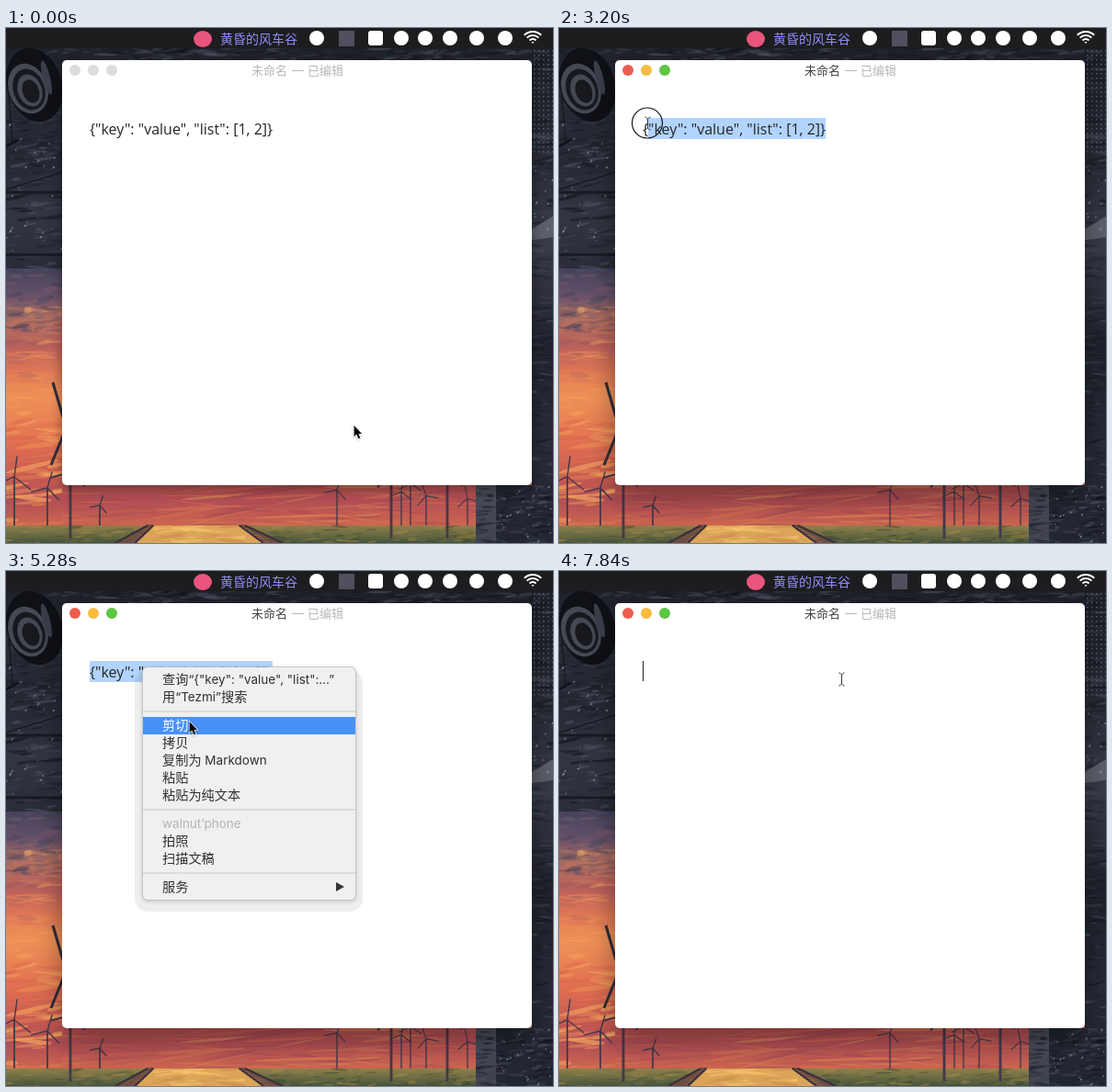
An HTML page with a canvas for the animation above (8000 ms loop, 595 by 561 pixels).

```html
<!DOCTYPE html>
<html lang="zh">
<head>
<meta charset="utf-8">
<style>
html, body { margin: 0; width: 100%; height: 100%; overflow: hidden; background: #1d1d20; }
canvas { display: block; width: 595px; height: 561px; }
</style>
</head>
<body>
<canvas id="stage" width="595" height="561"></canvas>
<script>
const W = 595, H = 561, LOOP = 8000, STEP = 160;
const HORIZON = 542, SKY = 262, EDGE = 511;
const CJK = '"Noto Sans CJK SC", "Noto Sans CJK", "Noto Sans", sans-serif';
const LATIN = 'Inter, sans-serif';
const view = document.getElementById('stage').getContext('2d');
const wall = document.createElement('canvas');
wall.width = W;
wall.height = H;
let c = wall.getContext('2d');

let seed = 41;
function rnd(a, b) {
  seed = (seed * 16807) % 2147483647;
  return a + (b - a) * seed / 2147483647;
}
const pick = list => list[Math.floor(rnd(0, list.length))];

function rect(color, x, y, w, h) {
  c.fillStyle = color;
  c.fillRect(x, y, w, h);
}
function round(color, x, y, w, h, r) {
  c.fillStyle = color;
  c.beginPath();
  c.roundRect(x, y, w, h, r);
  c.fill();
}
function oval(color, x, y, rx, ry = rx, turn = 0) {
  c.fillStyle = color;
  c.beginPath();
  c.ellipse(x, y, rx, ry, turn, 0, 7);
  c.fill();
}
function ring(color, width, x, y, r, from = 0, to = 7) {
  c.strokeStyle = color;
  c.lineWidth = width;
  c.beginPath();
  c.arc(x, y, r, from, to);
  c.stroke();
}
function trace(pts) {
  c.beginPath();
  for (let i = 0; i < pts.length; i += 2) c.lineTo(pts[i], pts[i + 1]);
}
function poly(color, ...pts) {
  c.fillStyle = color;
  trace(pts);
  c.fill();
}
function line(color, width, ...pts) {
  c.strokeStyle = color;
  c.lineWidth = width;
  trace(pts);
  c.stroke();
}
function text(str, x, y, color, font) {
  c.font = font;
  c.fillStyle = color;
  c.fillText(str, x, y);
}
function shadowed(alpha, blur, dy, draw) {
  c.save();
  c.shadowColor = `rgba(0,0,0,${alpha})`;
  c.shadowBlur = blur;
  c.shadowOffsetY = dy;
  draw();
  c.restore();
}

// A box filled with evenly spaced colours from top to bottom
function shade(x, y, w, h, ...colors) {
  const g = c.createLinearGradient(0, y, 0, y + h);
  colors.forEach((color, i) => g.addColorStop(i / (colors.length - 1), color));
  rect(g, x, y, w, h);
}
// Brush strokes scattered in a box
function strokes(x, y, w, h, n, long, thick, colors) {
  c.save();
  c.beginPath();
  c.rect(x, y, w, h);
  c.clip();
  for (let i = 0; i < n; i++) {
    c.globalAlpha = rnd(0.15, 0.6);
    oval(pick(colors), rnd(x, x + w), rnd(y, y + h), rnd(long / 4, long), rnd(0.5, thick), rnd(-0.25, 0.15));
  }
  c.restore();
}
function snow(x, y, w, h, n) {
  for (let i = 0; i < n; i++)
    oval(`rgba(190,200,220,${rnd(0.2, 0.7)})`, rnd(x, x + w), rnd(y, y + h), rnd(0.5, 1.8), 0.8, 2.3);
}

// Wallpaper
function sky() {
  shade(0, SKY, W, HORIZON - SKY, '#454359', '#64506a', '#b46f5f', '#b8605c', '#de7855',
    '#ee9158', '#e98053', '#dc6c50', '#c95c51', '#b04e54', '#cd6650');
  strokes(0, SKY, 61, 70, 60, 14, 3, ['#3b3c52', '#74566a', '#55506a']);
  strokes(0, 300, 61, 26, 9, 14, 4, ['#f8bd63', '#f0a05c']);
  strokes(0, 325, 61, 60, 30, 24, 3, ['#8d5363', '#d9705a', '#ef9a5c']);
  strokes(0, 385, 61, 157, 60, 30, 3, ['#f7a95f', '#d9604f', '#f08c55']);
  strokes(61, 498, 450, 44, 90, 60, 2, ['#9a4355', '#dc7450', '#e08c58', '#b64d52']);
}

function turbine(x, top, foot, size, width) {
  const color = '#46384a', turn = Math.sin(x);
  line(color, width, x, top, x, foot);
  for (let k = 0; k < 3; k++) {
    const a = turn / 3 + (k * 4 - 3) * Math.PI / 6;
    line(color, width * 0.8, x, top, x + Math.cos(a) * size, top + Math.sin(a) * size);
  }
}

function track(top, foot) {
  for (let k = 0; k < 1; k += 0.12) {
    const x = top + (foot - top) * k;
    line('#6f4c42', 2, x - 1, HORIZON + k * 19, x + 7 + k * 16, HORIZON + k * 19);
  }
  line('#38303a', 2, top, HORIZON, foot, H);
  line('#38303a', 2, top + 6, HORIZON, foot + 21, H);
}

function field() {
  shade(0, HORIZON, EDGE, 19, '#927f4a', '#6a6c44', '#46523a');
  strokes(0, HORIZON, EDGE, 19, 150, 12, 2, ['#a88a4c', '#39462f', '#7a7846']);
  poly('#dba557', 158, HORIZON, 256, HORIZON, 290, H, 136, H);
  strokes(160, HORIZON, 100, 19, 30, 25, 2, ['#f3c56e', '#c98d4e']);
  track(154, 119);
  track(254, 280);
  for (const x of [9, 45, 102]) turbine(x, 486 + x / 3, HORIZON, 24 - x / 8, 1.8);
  for (const x of [360, 430, 440, 457, 502]) turbine(x, rnd(495, 515), HORIZON, 14, 1.4);
  for (const x of [70, 419, 480]) turbine(x, 484, H - 5, 22, 2.8);
  line('#312d3a', 3, 51, 386, 62, 424);
  line('#312d3a', 3, 62, 444, 49, 476);
}

function machinery() {
  const metal = ['#12141b', '#3d424e', '#1a1e27', '#505562'];
  shade(0, 22, W, SKY - 22, '#20222a', '#282b35', '#242832', '#323642', '#2a2d38');
  strokes(0, 22, 61, 240, 170, 14, 2, metal);
  oval('#0f1117', 31, 62, 30, 41, -0.3);
  for (let k = 0; k < 4; k++) oval(k % 2 ? '#17191f' : '#454953', 24 + k, 66 + k, 21 - k * 4, 28 - k * 5, -0.35);
  oval('#3c3f4a', 44, 54, 4, 19, -0.25);
  line('#12141b', 3, 0, 129, 13, 122);
  line('#12141b', 1, 3, 72, 7, 124);
  for (const y of [179, 247]) line('#171a22', 3, 0, y, 61, y);
  line('#171a22', 1.5, 0, 176, 61, 157);
  snow(0, 105, 61, 140, 28);
  strokes(61, 22, EDGE, 13, 150, 14, 2, metal);

  shade(EDGE, 498, 22, 63, '#4b4f5b', '#3d414d');
  rect('#222732', 533, 498, 62, 63);
  shade(572, 22, 23, 539, '#1c1f27', '#262a34', '#383c48', '#20242e', '#262b37', '#222732');
  strokes(572, 22, 23, 539, 170, 12, 2, metal);
  strokes(EDGE, 498, 84, 63, 110, 10, 2, metal);
  for (let y = 24; y < 135; y += 5)
    for (let x = 574; x < W; x += 5) rect('#555d6d', x, y, 1.5, 1.5);
  poly('#5d606b', 572, 219, W, 205, W, 228, 572, 231);
  snow(572, 155, 23, 65, 10);
  snow(535, 500, 60, 60, 22);
}

function menuBar() {
  rect('#1d1d20', 0, 0, W, 22);
  oval('#e9557c', 214, 12, 10, 9);
  text('黄昏的风车谷', 233, 17, '#918cf8', '14px ' + CJK);
  rect('#50505e', 362, 3, 17, 17);
  round('#fff', 394, 3, 16, 16, 3);
  for (const x of [338, 430, 456, 483, 512, 543]) oval('#fff', x, 11, 8);
  for (let r = 1; r < 14; r += 4) ring('#fff', 2, 573, 17, r, -Math.PI * 0.75, -Math.PI * 0.25);
}

// Editor
const LINE = '{"key": "value", "list": [1, 2]}';
const BODY = '16px "Open Sans", sans-serif';
const LEFT = 91, RIGHT = 290;

function sheet(active) {
  shadowed(0.4, active ? 30 : 14, active ? 11 : 5, () => round('#fff', 61, 35, 511, 463, 5));
  ['#ee5c50', '#f6bd42', '#5dc643'].forEach((color, i) =>
    oval(active ? color : '#dcdcdd', 75 + i * 20, 46, 6));
  const font = '13px ' + CJK;
  text('未命名', 267, 51, active ? '#434343' : '#b8b8b8', font);
  line('#b8b8b8', 1, 311, 46.5, 324, 46.5);
  text('已编辑', 328, 51, '#b8b8b8', font);
}

// Letter gap nearest to x
function snap(x) {
  c.font = BODY;
  const gaps = [...LINE].map((_, i) => LEFT + c.measureText(LINE.slice(0, i)).width);
  return gaps.reduce((a, b) => Math.abs(b - x) < Math.abs(a - x) ? b : a, RIGHT);
}

// Context menu
const MENU = { x: 149, y: 105, w: 231, h: 253, row: 19, gap: 12 };
const DISABLED = 'walnut’phone';
const GROUPS = [
  ['查询“{"key": "value", "list":…”', '用“Tezmi”搜索'],
  ['剪切', '拷贝', '复制为 Markdown', '粘贴', '粘贴为纯文本'],
  [DISABLED, '拍照', '扫描文稿'],
  ['服务']
];

function label(str, x, y, color, weight) {
  for (const run of str.match(/[\u4e00-\u9fff]+|[^\u4e00-\u9fff]+/g)) {
    const font = /[\u4e00-\u9fff]/.test(run) ? '14.2px ' + CJK : '13.5px ' + LATIN;
    text(run, x, y, color, weight + ' ' + font);
    x += c.measureText(run).width;
  }
}

function contextMenu(pointer) {
  const { x, y, w, h, row, gap } = MENU;
  round('rgba(0,0,0,.065)', x - 9, y + 3, w + 17, h + 10, 14);
  shadowed(0.2, 4, 1, () => round('#c2c2c2', x - 0.7, y - 0.7, w + 1.4, h + 1.4, 5.5));
  round('#f0f0f0', x, y, w, h, 5);
  let top = y + 4;
  GROUPS.forEach((group, i) => {
    if (i) {
      rect('#dcdcdc', x, top + gap / 2 - 1, w, 2);
      top += gap;
    }
    for (const str of group) {
      const off = str === DISABLED;
      const hot = !off && pointer.x > x && pointer.y >= top && pointer.y < top + row;
      if (hot) rect('#4891f7', x, top, w, row);
      label(str, 170, top + 14, hot ? '#fff' : off ? '#b4b4b4' : '#303030', hot ? 500 : 400);
      top += row;
    }
  });
  poly('#353535', 359, 339, 368, 344, 359, 349);
}

// Pointer: time, x, y
const PATH = [
  [0, 378, 432], [960, 340, 250], [1600, 340, 250], [2240, 302, 126], [2720, 291, 110],
  [3200, 96, 104], [3840, 148, 104], [4160, 188, 149], [5280, 199, 163],
  [7200, 204, 170], [7840, 307, 118], [LOOP, 307, 118]
];

function pointerAt(t) {
  const i = PATH.findIndex(([end]) => t < end);
  const [t0, x0, y0] = PATH[i - 1], [t1, x1, y1] = PATH[i];
  const k = (t - t0) / (t1 - t0), ease = k * k * (3 - 2 * k);
  return { x: x0 + (x1 - x0) * ease, y: y0 + (y1 - y0) * ease };
}

function arrow() {
  trace([0.6, 1, 0.6, 13.2, 3.3, 10.6, 5.3, 15.3, 7.3, 14.4, 5.4, 9.9, 9, 9.9]);
  c.closePath();
  c.strokeStyle = '#fff';
  c.lineWidth = 1.4;
  shadowed(0.25, 3, 1, () => c.stroke());
  c.fillStyle = '#000';
  c.fill();
}

function beam() {
  line('#333', 1, 0.5, -5, 0.5, 5);
  for (const s of [-1, 1])
    for (const d of [-3, 3]) line('#333', 1, 0.5, 5 * s, 0.5 + d / 2, 6.5 * s, 0.5 + d, 7 * s);
}

const within = (t, a, b) => t >= a && t < b;

function draw(t) {
  const p = pointerAt(t);
  const active = t >= 1440, open = within(t, 3840, 7360), cut = t >= 7360;
  const overText = within(t, 2720, 3840) || t >= 7520;
  const pressed = within(t, 1440, 1600) || within(t, 2720, 3360) || within(t, 3840, 4000);
  c.drawImage(wall, 0, 0);
  sheet(active);
  menuBar();

  if (within(t, 2720, 7360)) {
    const from = t <= 3200 ? snap(p.x) : LEFT;
    rect('#b2d4fc', from, 98, RIGHT - from, 23);
  }
  if (cut) rect('#222', LEFT, 98, 1, 22);
  else text(LINE, LEFT, 116, '#262626', BODY);
  if (open) contextMenu(p);

  c.save();
  c.translate(Math.round(p.x), Math.round(p.y));
  if (overText) beam();
  else arrow();
  if (pressed) ring('#111', 1.2, 0, -0.5, 16.5);
  c.restore();
}

sky();
field();
machinery();
c = view;
const start = performance.now();
function tick() {
  const t = (performance.now() - start) % LOOP;
  draw(Math.floor(t / STEP) * STEP);
  requestAnimationFrame(tick);
}
tick();
</script>
</body>
</html>
```
